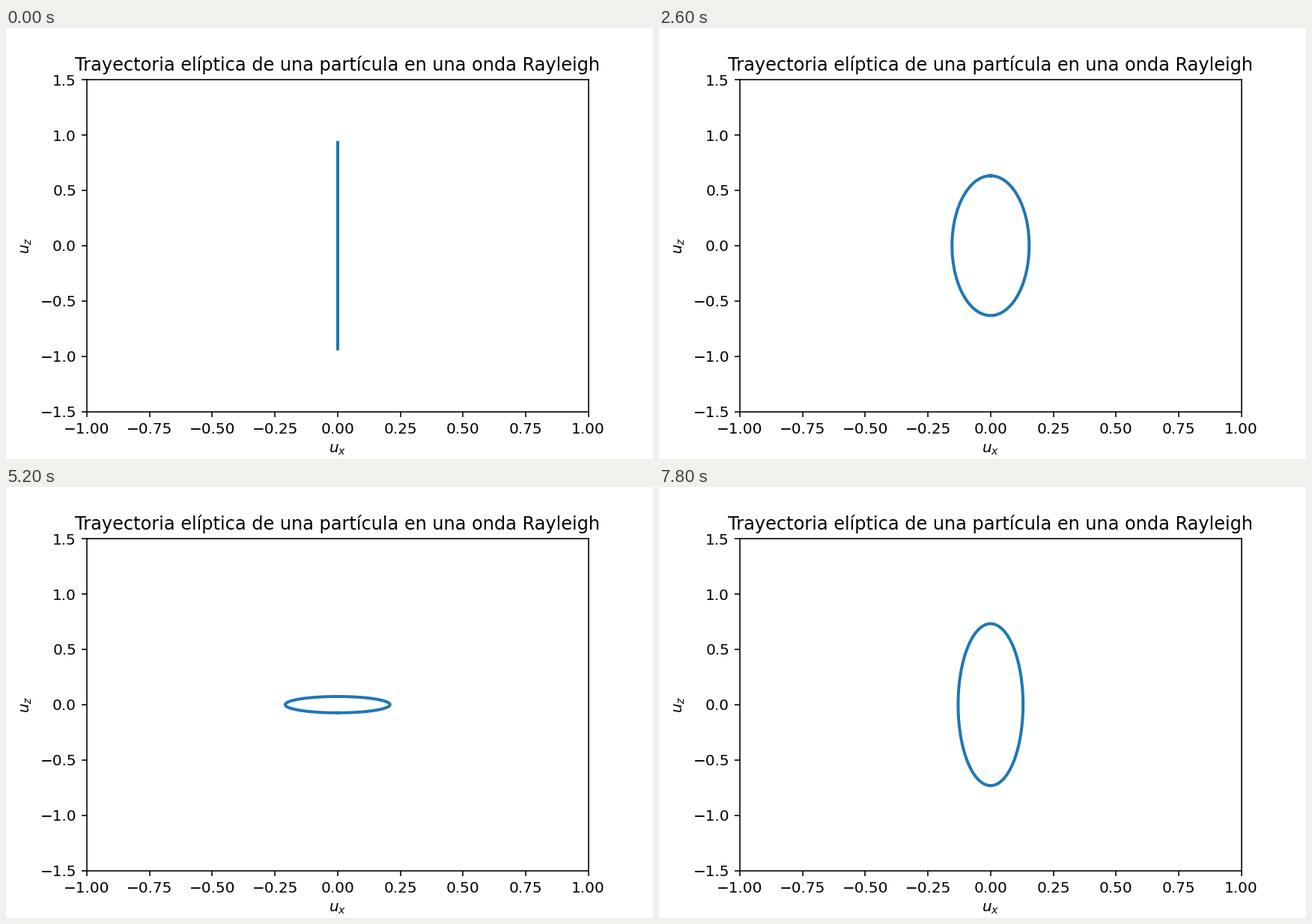
A matplotlib script for the animation above (8000 ms loop, 864 px wide and 576 px high).

```python
import numpy as np
import matplotlib.pyplot as plt
from matplotlib.animation import FuncAnimation

FRAMES = 40
INTERVAL = 200
AMP_X, AMP_Z = 0.2095, 0.931

phases = np.linspace(0, 2 * np.pi, 100)
t = np.linspace(0, 2 * np.pi, 241)

fig, ax = plt.subplots(figsize=(6, 4), dpi=144)
ax.set_xlim(-1, 1)
ax.set_ylim(-1.5, 1.5)
ax.set_xlabel(r"$u_x$")
ax.set_ylabel(r"$u_z$")
ax.set_title("Trayectoria elíptica de una partícula en una onda Rayleigh")
line, = ax.plot([], [], lw=2)


def update(i):
    # The horizontal axis grows as the vertical one shrinks, and back.
    phase = phases[i]
    line.set_data(AMP_X * np.sin(phase) * np.sin(t),
                  AMP_Z * np.cos(phase) * np.cos(t))
    return line,


anim = FuncAnimation(fig, update, frames=FRAMES, interval=INTERVAL,
                     repeat=True, repeat_delay=0)
plt.show()
```
